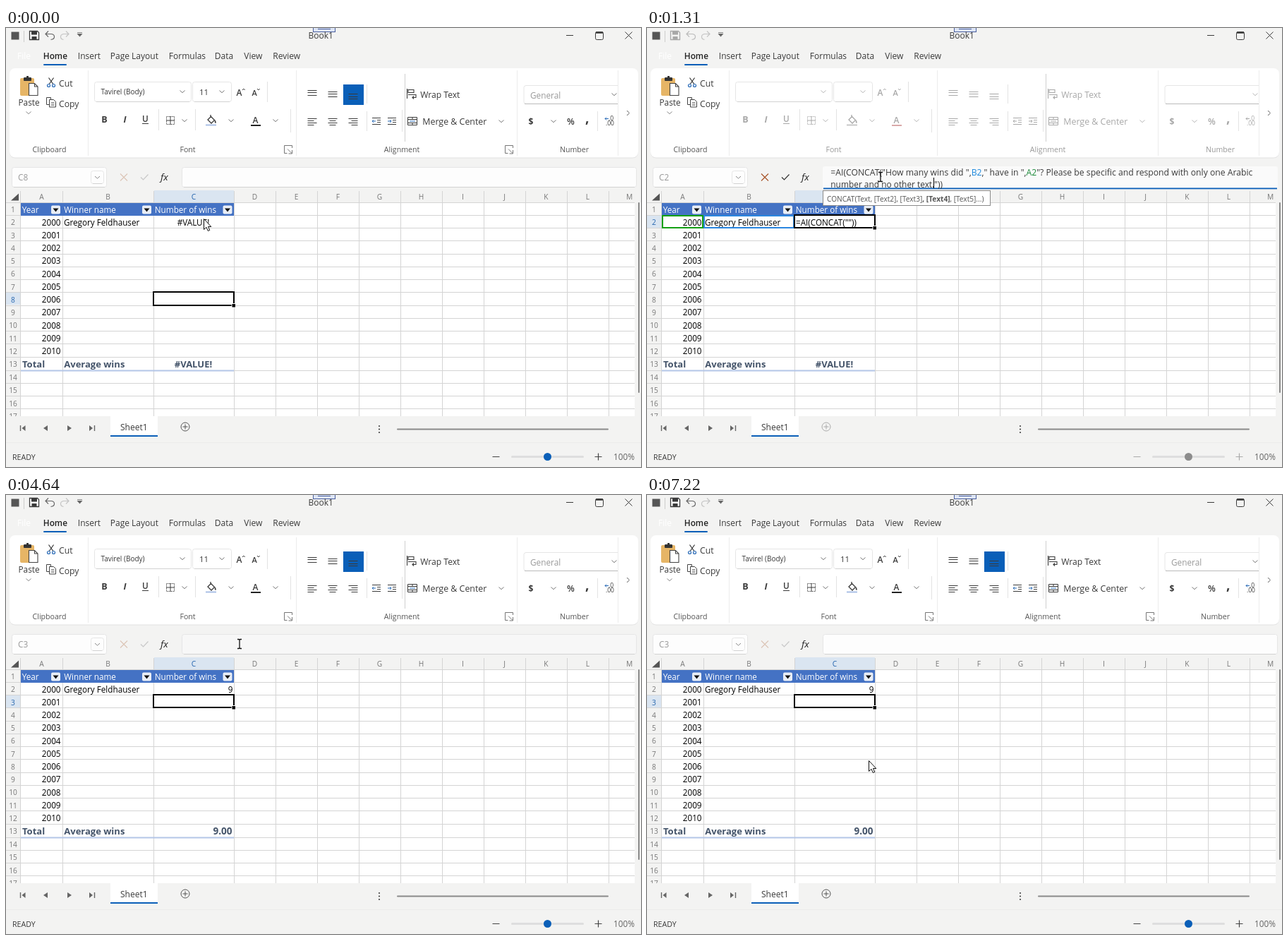
An HTML page for the animation above (7.82 s loop, 900 by 622 pixels).

```html
<!DOCTYPE html>
<html lang="en">
<head>
<meta charset="utf-8">
<title>Spreadsheet formula</title>
<style>
  html, body { margin: 0; width: 100%; height: 100%; overflow: hidden; background: #f3f3f2; }
  svg { display: block; font-family: "Open Sans", "Noto Sans", sans-serif; }
</style>
</head>
<body>
<svg id="stage" width="900" height="622" viewBox="0 0 900 622">
  <g id="base"></g><g id="ribbon"></g><g id="sheet"></g><g id="cursor"></g>
</svg>
<script>
const LOOP = 7820, EDIT = 1240, PASTE = 1310, FILL = 1380, DONE = 4640;
const INK = '#3a3a3a', BLUE = '#0a5fb8', GRID = '#d4d4d4', BG = '#f3f3f2';
const MID = 'text-anchor="middle"', END = 'text-anchor="end"', BOLD = 'font-weight="700"';
const $ = id => document.getElementById(id);

const text = (x, y, s, size = 12, fill = INK, attr = '') =>
  `<text x="${x}" y="${y}" font-size="${size}" fill="${fill}" ${attr}>${s}</text>`;
const rect = (x, y, w, h, fill, attr = '') =>
  `<rect x="${x}" y="${y}" width="${w}" height="${h}" fill="${fill}" ${attr}/>`;
const path = (d, color = INK, w = 1, fill = 'none') =>
  `<path d="${d}" stroke="${color}" stroke-width="${w}" fill="${fill}"/>`;
const shape = (d, fill) => `<path d="${d}" fill="${fill}"/>`;
const vline = (x, y1, y2, color = '#e3e3e3') => path(`M${x + .5} ${y1}V${y2}`, color);
const chevron = (x, y, color = '#8a8a8a') => path(`M${x - 3.5} ${y - 1.5}l3.5 3.2 3.5-3.2`, color);
const box = (x, y, w, h, fill = '#fdfdfd') =>
  rect(x + .5, y + .5, w - 1, h - 1, fill, 'stroke="#e6e6e6" rx="3"') +
  path(`M${x + 3} ${y + h - .5}h${w - 6}`, '#d2d2d2');

// Sheet geometry; the totals row is a little taller
const colX = [21, 80, 209, 323, 382, 441, 500, 559, 618, 677, 736, 795, 854, 913];
const rowTop = r => 247.5 + 18.25 * (r - 1) + (r > 13 ? .9 : 0);
const rowY = r => Math.round(rowTop(r));
const rowBase = r => rowTop(r) + 13.8;

function drawBase() {
  let s = rect(0, 0, 900, 622, BG);
  // Title bar
  s += rect(7.5, 5.5, 11, 11, '#555') + vline(25, 4, 20, '#ccc');
  s += rect(435.5, -2, 31, 7.5, '#dde5f5', 'stroke="#4a5f9e"') + path('M442 1.5h18', '#4a5f9e');
  s += text(428.5, 14.5, 'Book1');
  s += path('M794 10.5h10M877.5 5.5l10 10m0-10l-10 10') +
    rect(835.5, 5.5, 11, 11, 'none', `stroke="${INK}" rx="2"`) + path('M836 6.5h10', INK, 2.5);
  s += shape('M100.5 8h8l-4 4.5z', '#666') + path('M101 6.5h7', '#888');
  // Tabs
  s += text(16, 43.5, 'File', 12, '#fff') + text(52.8, 43.5, 'Home', 11.8, '#222', 'font-weight="600"');
  [['Insert', 101], ['Page Layout', 147], ['Formulas', 230], ['Data', 295], ['View', 336.5], ['Review', 377.5]]
    .forEach(([name, x]) => s += text(x + .8, 43.5, name));
  s += rect(53, 51, 33, 2, BLUE, 'rx="1"');
  // Ribbon panel and clipboard group
  s += rect(5, 58.5, 891, 126, '#e2e2e2', 'rx="8"') + rect(5, 57, 891, 126.5, '#fff', 'rx="8"');
  [116, 411, 724, 867].forEach(x => s += vline(x, 60, 181, '#ececec'));
  s += rect(20, 71, 20, 25, '#e6b566', 'rx="2"') + rect(25, 70, 11, 5, '#333', 'rx="1"') +
    path('M30.5 68v4', '#333', 3) +
    path('M32.5 78.5h8l4.5 4.5v12.5h-12.5zM40.5 78.5v4.5h4.5', '#444', 1.1, '#fff');
  s += text(17.5, 110, 'Paste', 11.8) + chevron(32, 120);
  s += path('M60.5 70.5l7 10M67.5 70.5l-7 10', '#333', 1.2) +
    '<g fill="#fff" stroke="#2b6cb8" stroke-width="1.2"><circle cx="60.5" cy="81.5" r="2"/><circle cx="67.5" cy="81.5" r="2"/></g>';
  s += text(75, 82.5, 'Cut', 12.2) + text(75, 111.5, 'Copy', 12.2);
  s += path('M57.5 98.5h6v10h-6z', '#444', 1, '#fff') +
    path('M61.5 101.5h6l3 3v7.5h-9zM64 106h4.5M64 109h4.5', '#444', 1, '#fff');
  s += text(61.5, 176, 'Clipboard', 10.6, '#555', MID) + path('M880 117l3.5 3.5-3.5 3.5', '#666');
  // Sheet tabs
  s += shape('M27.5 563v8l-5-4zM59 563v8l-6-4zM87 563v8l6-4zM118 563v8l5-4z', '#666') +
    path('M20.5 563v8M125.5 563v8', '#666', 1.4);
  s += rect(148, 549, 67, 29, '#fff') + rect(148, 577, 67, 2, BLUE) + text(162, 569.5, 'Sheet1');
  [564, 568.5, 573].forEach(y => s += `<circle cx="529" cy="${y}" r="1.1" fill="#444"/>`);
  s += rect(554, 567.5, 300, 2, '#8a8a8a', 'rx="1"') + rect(896, 247, 2, 270, '#8a8a8a', 'rx="1"');
  s += path('M0 587.5H900', '#ebebeb');
  s += text(9, 612, 'READY', 10.6) + text(861, 612, '100%', 11.8, '#666');
  s += rect(716, 606, 103, 3, '#dedede', 'rx="1.5"');
  // Grid
  s += rect(21, 248, 870, 302, '#fff');
  let grid = 'M20.5 231V550';
  colX.slice(1, 13).forEach(x => grid += `M${x + .5} 231V550`);
  for (let r = 1; r <= 17; r++) grid += `M0 ${rowY(r) - .5}H891`;
  s += path(grid, GRID) + shape('M18 234.5v10h-11z', '#555');
  return s;
}

// Ribbon and bars; dimmed while a formula is edited
function drawRibbon(off) {
  const ink = off ? '#a8a8a8' : INK, soft = off ? '#b8b8b8' : '#777', accent = off ? ink : '#2b6cb8';
  const chev = (x, y) => chevron(x, y, soft);
  const rows = (cx, ys, widths, align = 1) => path(ys.map((y, i) => {
    const w = widths[i % widths.length];
    return `M${cx - 6.5 + (13 - w) * align / 2} ${y + .5}h${w}`;
  }).join(''), ink, 1.1);
  let s = '';
  // Quick access icons
  s += path('M33.5 4.5h11l2 2v10h-13z', ink, 1.3, off ? 'none' : '#fff') +
    rect(36, 5, 8, 4.5, ink) + rect(36.5, 12, 7, 4.5, ink);
  s += path('M60 4.5l-4 4 4 4M56.5 8.5h8q4 .5 4 4t-5 4', off ? '#bbb' : '#666', 1.2) +
    path('M85 4.5l4 4-4 4M88.5 8.5h-7q-4 .5-4 4t4 4', '#c4c4c4', 1.2);
  // Font group
  s += box(125, 76, 138, 29, '#fff') + chev(250, 90) + box(264, 76, 56, 29, '#fff') + chev(306, 90);
  if (!off) s += text(134.5, 94, 'Tavirel (Body)', 10) + text(274, 95, '11', 11.5);
  s += text(326.5, 96, 'A', 12, ink, 'font-weight="600"') + path('M335 88l1.8-2 1.8 2', ink) +
    text(348.5, 96, 'A', 11, ink, 'font-weight="600"') + path('M356 86l1.8 2 1.8-2', ink);
  s += text(139.5, 133.5, 'B', 12.5, ink, `${BOLD} ${MID}`) +
    text(168.5, 133.5, 'I', 12.5, ink, `${BOLD} ${MID} font-style="italic"`) +
    text(197.5, 132.5, 'U', 11.8, ink, `font-weight="600" ${MID}`) + path('M193 135.5h9', ink);
  s += rect(227.5, 125.5, 11, 11, 'none', `stroke="${ink}" stroke-dasharray="1.5 1.25"`) +
    path('M233 125v12M227 131h12', ink) + chev(253, 131);
  s += path('M286 130l4.5-4.5 5 5-4.5 4.5zM290 123v4', ink, 1.3) +
    shape('M296 130q3 4 1 5-2-1-1-5z', ink) + rect(283, 136.5, 15, 2, off ? '#c8c8c8' : '#a9bfe6') + chev(319, 131);
  s += text(353.5, 135, 'A', 12, ink, `font-weight="600" ${MID}`) +
    rect(347, 137, 14, 2, off ? '#d9a9a9' : '#222') + chev(382, 131);
  [[216, 115, 145], [268, 115, 145], [370, 76, 105], [403, 115, 148], [511, 80, 107],
   [511, 118, 146], [561, 116, 147], [838, 118, 146]].forEach(v => s += vline(...v));
  s += vline(565, 65, 161, '#cfcfcf');
  // Alignment group
  if (!off) s += rect(478, 80, 29, 29, BLUE);
  s += rows(434, [88, 91, 95], [13]) + rows(463, [90, 93, 97], [13]) + rows(492, [93, 97, 100], [13]);
  [434, 463, 492].forEach((x, i) => s += rows(x, [128, 131, 134, 137], [13, 9], i));
  [[525, -1], [547, 1]].forEach(([x, dir]) => {
    s += path(`M${x - 6} 127.5h12M${x + 1} 130.5h5M${x + 1} 133.5h5M${x - 6} 136.5h12`, ink) +
      path(`M${x - 6} 132h5M${x - 3.5 + dir * 2.5} 132l${-dir * 2} -2m${dir * 2} 2l${-dir * 2} 2`, accent);
  });
  s += path('M568.5 86v14M570 87.5h8v4h-8zM570 94.5h11v4h-5M578 96.5l-2 2 2 2', ink, 1.1) +
    text(587.3, 98.5, 'Wrap Text', 12.1, ink);
  s += path('M569.5 126.5h13v11h-13zM569.5 129.5h13M569.5 134.5h13M576 126.5v3M576 134.5v3', ink) +
    path('M572 132h8', accent) + text(590.3, 136.5, 'Merge &amp; Center', 12.4, ink) + chev(702, 132);
  // Number group
  s += path('M867 81.5H737q-3 0-3 3v20q0 3 3 3', '#e6e6e6') + path('M735 107.5H867', '#bbb') + chev(862, 94);
  if (!off) s += text(743, 99.5, 'General', 11.8, '#999');
  s += text(740.5, 136.5, '$', 12, ink, BOLD) + chev(776, 132) +
    text(795, 136.5, '%', 12.5, ink, 'font-weight="600"') + text(821, 133.5, ',', 19, ink, BOLD);
  s += text(854, 131, '.0', 8.5, ink) + text(850, 138, '.00', 8.5, ink) +
    path('M849 128.5h5M851 126.5l-2 2 2 2', accent);
  // Group labels and dialog launchers
  const shift = off ? 7 : 0, label = off ? '#999' : '#555';
  [['Font', 257.5], ['Alignment', 561], ['Number', 805.5]]
    .forEach(([name, x]) => s += text(x + shift, 176, name, 10.6, label, MID));
  if (!off) [400, 713].forEach(x =>
    s += path(`M${x + 5.5} 170v-3.5h-11v11h4M${x - 1} 171.5l6 6M${x + 5.5} 173v5h-5`, '#777'));
  // New sheet button and zoom
  s += `<circle cx="254" cy="565" r="6" fill="none" stroke="${off ? '#aaa' : '#555'}"/>` +
    path('M250.5 565h7M254 561.5v7', off ? '#aaa' : '#555');
  s += path('M689.5 607.5h10M834.5 607.5h10M839.5 602.5v10', off ? '#aaa' : '#444', 1.2) +
    `<circle cx="767.5" cy="607.5" r="5.5" fill="${off ? '#8c8c8c' : BLUE}"/>`;
  return s;
}

const EMPTY = '=AI(CONCAT(""))';
const formulaHead = ref2 =>
  `=AI(CONCAT("How many wins did ",<tspan fill="#1b87dc">B2</tspan>," have in ",${ref2}"? Please be specific and respond with only one Arabic`;

function drawSheet({ row, edit, pasted, filled, done, hover, caret }) {
  let s = '';
  // Name box and formula bar
  s += box(8, 197, 135, 29) + text(17, 216, 'C' + row, 11.8, '#999') + box(120, 202, 19, 19) + chevron(129.5, 211.5);
  s += path('M162 206.5l10 10m0-10l-10 10', edit ? '#a8562c' : '#dcc6b8', 1.2) +
    path('M191 211.5l3.5 3.5 7-7.5', edit ? '#333' : '#c8c8c8', 1.2) +
    text(219, 216, 'fx', 13.5, '#222', 'font-style="italic"');
  s += box(249, 197, 645, 29, hover ? '#f7f7f7' : '#fdfdfd');
  if (edit) s += rect(249, 196, 645, 32, '#fafafa', 'rx="3"') + rect(250, 226.5, 643, 1.8, BLUE);
  if (pasted) {
    s += text(260.3, 208.5, formulaHead('<tspan fill="#1d8a3a">A2</tspan>'), 12.2) +
      text(260.3, 225.5, 'number and no other text."))', 11.9);
    if (caret) s += vline(406, 212, 227, '#000');
  } else if (row === 2) s += text(260.3, 216, EMPTY, 12.2, edit ? INK : '#888');

  // Headers
  s += rect(210, 230, 113, 17, '#dae5f1') + rect(0, rowY(row), 20, 17, '#dae5f1');
  colX.slice(0, 13).forEach((x, i) =>
    s += text((x + colX[i + 1]) / 2, 243, 'ABCDEFGHIJKLM'[i], 10.2, i === 2 ? '#2565ae' : '#777', MID));
  for (let r = 1; r <= 17; r++)
    s += text(10, rowBase(r) - .3, r, 10.2, r === row ? '#2565ae' : '#777', MID);
  s += rect(0, 550, 148, 8, BG);

  // Table
  s += rect(21, 248, 302, 18, '#4472c4');
  ['Year', 'Winner name', 'Number of wins'].forEach((name, i) => {
    const x = [70.5, 199.5, 314][i];
    s += text([22.8, 82.3, 210.8][i], 262, name, 11.7, '#fff') +
      rect(x - 6.5, 251.5, 13, 12, '#e9eef6', 'rx="2"') + shape(`M${x - 4} 255.5h8l-4 5z`, '#111');
  });
  for (let r = 2; r <= 12; r++) s += text(77.5, rowBase(r), 1998 + r, 11.7, '#000', END);
  s += text(82, rowBase(2), 'Gregory Feldhauser', 11.7, '#000');
  const total = '#44546a';
  s += text(23, 481, 'Total', 13, total, BOLD) + text(82.3, 481, 'Average wins', 13, total, BOLD) +
    rect(21, 484.5, 302, 2, '#b4c6e7');
  s += done ? text(321.5, rowBase(2), '9', 11.7, '#000', END) + text(320.5, 481, '9.00', 13.5, total, `${BOLD} ${END}`)
            : text(265.5, 481, '#VALUE!', 13, total, `${BOLD} ${MID}`);
  if (!done && !edit) s += text(265.5, rowBase(2), '#VALUE!', 11.7, '#000', MID);

  // Selection and cell editor
  const y = rowY(row), h = rowY(row + 1) - y;
  if (edit) s += rect(22, y, 57, h - 1, 'none', 'stroke="#14a014" stroke-width="2"') +
    rect(81, y, 127, h - 1, 'none', 'stroke="#2a86e0" stroke-width="2"');
  s += rect(209, y - 1, 114, h, 'none', 'stroke="#000" stroke-width="2"') +
    rect(319.5, y + h - 4, 6, 6, '#fff') + rect(320.5, y + h - 3, 4.5, 4.5, '#000');
  if (filled)
    s += rect(210, 266.5, 681, 35, '#fff') + text(211, 279.5, formulaHead('A2') + ' number and no', 11.7, '#000') +
      text(211, 296, 'other text."))', 11.9, '#000');
  else if (edit) s += text(211, 279.5, EMPTY, 11.7, '#000');

  // Argument hint
  if (edit) s += rect(249.5, 230.5, 237, 21, '#fff', 'stroke="#8a8a8a"') +
    text(255, 245.5, `CONCAT(Text, [Text2], [Text3]<tspan ${BOLD}>, [Text4]</tspan>, [Text5]...)`, 10.15, '#555');
  return s;
}

const arrow = path('M.5 .5V15.5L4 12.3 6.3 17.5 8.7 16.5 6.5 11.5H10.8Z', '#111', 1, '#fff');
const beam = path('M-3 -6.5H-1Q0 -6.5 0 -5.5V5.5Q0 6.5 -1 6.5H-3M3 -6.5H1Q0 -6.5 0 -5.5M3 6.5H1Q0 6.5 0 5.5', '#111', 1.3);

// Pointer track: time, x, y
const track = [
  [0, 280, 270], [180, 281, 268], [340, 281, 268], [670, 295, 229], [1160, 331, 211], [5430, 331, 211],
  [5850, 370, 414], [5990, 365, 455], [6270, 324, 396], [6340, 320, 388], [6900, 320, 388], [7180, 314, 376]];

// The pointer moves in 70 ms steps
function pointer(t) {
  const q = Math.max(0, Math.floor((t - 40) / 70) * 70 + 40);
  const i = track.findIndex(k => k[0] > q);
  if (i < 0) return track[track.length - 1].slice(1);
  const a = track[i - 1], b = track[i], u = (q - a[0]) / (b[0] - a[0]);
  return [1, 2].map(n => Math.round(a[n] + (b[n] - a[n]) * u));
}

const shown = {};
function show(id, key, draw) {
  if (shown[id] === key) return;
  shown[id] = key;
  $(id).innerHTML = draw();
}

function render(t) {
  const edit = t >= EDIT && t < DONE;
  const [x, y] = pointer(t), hover = y < 226;
  const state = {
    row: t < 140 ? 8 : t < DONE ? 2 : 3,
    edit, hover,
    pasted: edit && t >= PASTE,
    filled: edit && t >= FILL,
    done: t >= DONE,
    caret: t < 2180 || (t >= 2380 && t < 2640) || t >= 3710
  };
  show('ribbon', edit, () => drawRibbon(edit));
  show('sheet', JSON.stringify(state), () => drawSheet(state));
  show('cursor', hover, () => hover ? beam : arrow);
  $('cursor').setAttribute('transform', `translate(${x} ${y})`);
}

const start = performance.now();
function loop() {
  render((performance.now() - start) % LOOP);
  requestAnimationFrame(loop);
}
$('base').innerHTML = drawBase();
loop();
</script>
</body>
</html>
```
